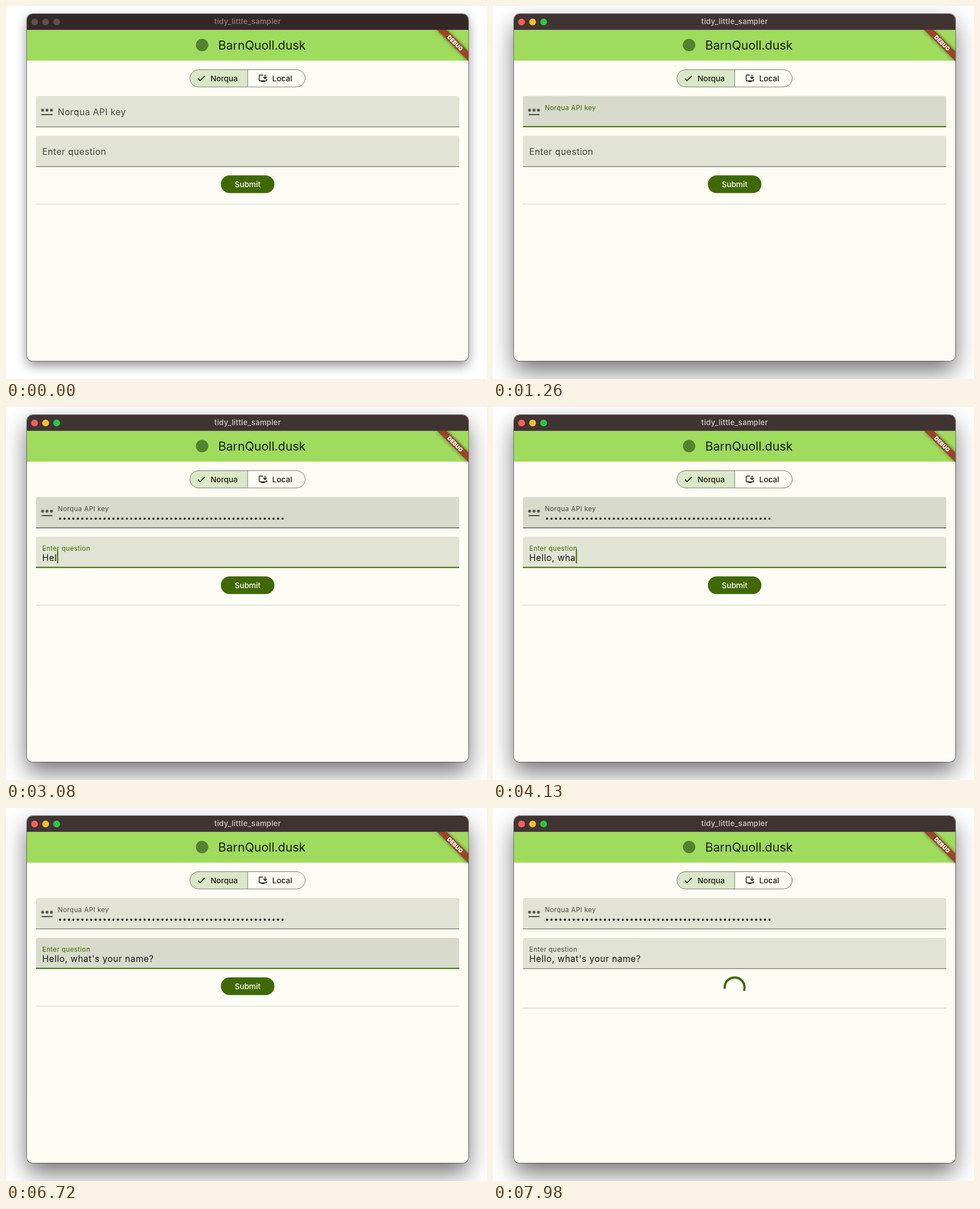
An HTML page for the animation above (8 s loop, 850x659 px).

```html
<!DOCTYPE html>
<html lang="en">
<head>
<meta charset="utf-8">
<title>Question form</title>
<style>
  html, body { margin: 0; width: 100%; height: 100%; overflow: hidden; background: #fff; }
  #shadow, svg { position: absolute; }
  #shadow {
    left: 37px; top: 14px; width: 780px; height: 613px; border-radius: 10px;
    box-shadow: 0 0 0 1px rgba(0,0,0,.4), 0 8px 20px rgba(0,0,0,.45);
  }
  .active #shadow { box-shadow: 0 0 0 1px rgba(0,0,0,.45), 0 18px 40px rgba(0,0,0,.55); }
  svg { left: 0; top: 0; display: block; }
  text { font-family: Inter, "Open Sans", sans-serif; font-optical-sizing: none; fill: #1a1c16; }
  .field { font-size: 15.6px; letter-spacing: .49px; }
  .button { font-size: 13.65px; font-weight: 550; }

  #bar { fill: #342827; }
  #windowTitle { font-size: 13px; font-weight: 600; letter-spacing: .25px; fill: #837876; }
  .light { fill: #5b4f4d; }
  .active #bar { fill: #403433; }
  .active #windowTitle { fill: #c3bab7; }
  .active .red { fill: #ff5f57; }
  .active .amber { fill: #febc2e; }
  .active .green { fill: #28c840; }

  .fill { fill: #e1e4d5; }
  .line { fill: #777b6e; }
  .label { fill: #44483d; }
  .hover .fill { fill: #d8dacc; }
  .hover .line { fill: #4a4d43; }
  .focus .line { fill: #3f6900; }
  .focus .label { fill: #3f6900; }
  .caret { fill: #3f6900; }
</style>
</head>
<body>
<div id="shadow"></div>
<svg width="850" height="659" viewBox="0 0 850 659">
  <defs>
    <clipPath id="frame"><rect x="37" y="14" width="780" height="613" rx="10"/></clipPath>
    <clipPath id="content"><rect x="37" y="42" width="780" height="585"/></clipPath>
    <filter id="blur" x="-20%" y="-100%" width="140%" height="300%"><feGaussianBlur stdDeviation="3"/></filter>
  </defs>

  <g clip-path="url(#frame)">
    <rect x="37" y="14" width="780" height="613" fill="#fdfdf5"/>
    <rect id="bar" x="37" y="14" width="780" height="28.5"/>
    <circle class="light red" cx="50.5" cy="28.2" r="6"/>
    <circle class="light amber" cx="70" cy="28.2" r="6"/>
    <circle class="light green" cx="89.5" cy="28.2" r="6"/>
    <text id="windowTitle" x="427" y="32.3" text-anchor="middle">tidy_little_sampler</text>

    <rect x="37" y="42.5" width="780" height="54" fill="#9fdb5c"/>
    <circle cx="346.5" cy="69" r="11" fill="#55822f"/>
    <text x="375" y="77" font-size="21.45">BarnQuoll.dusk</text>

    <g clip-path="url(#content)">
      <g transform="translate(817 42) rotate(45)">
        <rect x="-39" y="27.3" width="78" height="11.7" opacity=".5" filter="url(#blur)"/>
        <rect x="-39" y="27.3" width="78" height="11.7" fill="#9b4527"/>
        <text y="36.7" text-anchor="middle" font-size="9.9" font-weight="900" style="fill:#fff">DEBUG</text>
      </g>
    </g>
  </g>

  <path d="M427 112.5H340a15.25 15.25 0 0 0 0 30.5H427z" fill="#dbe7c8"/>
  <rect x="324.8" y="112.5" width="204" height="30.5" rx="15.25" fill="none" stroke="#75796c"/>
  <path d="M427 112.5v30.5" stroke="#75796c"/>
  <path transform="translate(336.4 119) scale(.731)" fill="#131f00"
        d="M9 16.17 4.83 12l-1.42 1.41L9 19 21 7l-1.41-1.41z"/>
  <text class="button" x="361.5" y="132.8">Norqua</text>
  <g transform="translate(445.3 119) scale(.731)" fill="#1a1c16">
    <path d="M20 17H4V5h8V3H4a2 2 0 0 0-2 2v12a2 2 0 0 0 2 2h4v2h8v-2h4a2 2 0 0 0 2-2v-3h-2z"/>
    <path d="M17 14l5-5-1.41-1.41L18 10.17V3h-2v7.17l-2.59-2.58L12 9z"/>
  </g>
  <text class="button" x="470.5" y="132.8">Local</text>

  <g id="key">
    <path class="fill" d="M53 214v-51a4 4 0 0 1 4-4H797a4 4 0 0 1 4 4v51z"/>
    <rect class="line" x="53" width="748"/>
    <g transform="translate(60.8 174.3) scale(.975)" fill="#44483d">
      <path d="M2 17h20v2H2z"/>
      <path id="star" d="M3.15 12.95 4 11.47l.85 1.48 1.3-.75-.85-1.48H7v-1.5H5.3l.85-1.47L4.85 7 4 8.47 3.15 7l-1.3.75.85 1.47H1v1.5h1.7l-.85 1.48z"/>
      <use href="#star" x="8"/><use href="#star" x="16"/>
    </g>
    <text class="field label">Norqua API key</text>
    <path id="dots" d="M95.6 197.2H489" stroke="#1a1c16" stroke-width="4" stroke-linecap="round" stroke-dasharray="0 7.86"/>
    <rect class="caret" y="181" width="2" height="25"/>
  </g>

  <g id="question">
    <path class="fill" d="M53 284.3v-51a4 4 0 0 1 4-4H797a4 4 0 0 1 4 4v51z"/>
    <rect class="line" x="53" width="748"/>
    <text class="field label">Enter question</text>
    <text id="typed" class="field" x="64" y="272.2" xml:space="preserve"></text>
    <rect class="caret" y="251.3" width="2" height="25"/>
  </g>

  <g id="submit">
    <rect x="379.7" y="299.3" width="94.6" height="31.2" rx="15.6" fill="#3f6900"/>
    <rect id="overlay" x="379.7" y="299.3" width="94.6" height="31.2" rx="15.6" fill="#fff"/>
    <text class="button" x="427" y="319.8" text-anchor="middle" style="fill:#fff">Submit</text>
  </g>
  <circle id="spinner" cx="427" cy="317" r="17.55" pathLength="360" fill="none"
          stroke="#3f6900" stroke-width="3.9" stroke-linecap="square"/>
  <rect id="divider" x="53" width="748" height="1" fill="#c9ccbe"/>
</svg>

<script>
const LOOP = 8000, STEP = 70;
const ACTIVATE = 630, KEY_FOCUS = 700, PASTE = 1540, QUESTION_FOCUS = 1960, PRESS = 6930, LOADING = 7140;
const MESSAGE = "Hello, what's your name?";
const KEYSTROKES = [
  2590, 2800, 3080, 3220, 3640, 3710, 3850, 3990, 4060, 4130, 4270, 4410,
  4410, 4550, 4760, 4900, 5040, 5040, 5180, 5320, 5600, 5670, 5810, 6090
];

const $ = id => document.getElementById(id);
const within = (t, from, to) => t >= from && t < to;
const clamp = x => Math.min(1, Math.max(0, x));
const show = (el, visible) => el.style.display = visible ? "" : "none";

// cubic-bezier(.4, 0, .2, 1)
function ease(x) {
  x = clamp(x);
  let low = 0, high = 1;
  for (let i = 0; i < 24; i++) {
    const s = (low + high) / 2;
    const at = 1.2 * s * (1 - s) ** 2 + .6 * s * s * (1 - s) + s ** 3;
    if (at < x) low = s; else high = s;
  }
  return low * low * (3 - 2 * low);
}

function makeField(id, labelX, bottom) {
  const group = $(id), part = name => group.querySelector("." + name);
  const line = part("line"), label = part("label"), caret = part("caret");
  return ({ focus, hover, float, caretX, caretOn }) => {
    group.classList.toggle("focus", focus);
    group.classList.toggle("hover", hover);
    const weight = focus ? 2 : 1.3;
    line.setAttribute("y", bottom - weight);
    line.setAttribute("height", weight);
    const y = bottom - 30 + 8.3 * (1 - float) ** 1.5;
    label.setAttribute("transform", `translate(${labelX} ${y}) scale(${1 - float / 4})`);
    caret.setAttribute("x", caretX);
    show(caret, caretOn);
  };
}
const drawKey = makeField("key", 91.5, 214.2);
const drawQuestion = makeField("question", 64, 284.4);

function drawSpinner(ms) {
  const cycle = ms % 1333 / 1333;
  const head = 270 * ease(cycle * 2), tail = 270 * ease(cycle * 2 - 1);
  const start = tail + ms / 2222 * 360 + cycle * 90 - 90;
  const sweep = Math.max(head - tail, .1);
  $("spinner").setAttribute("stroke-dasharray", `${sweep} ${360 - sweep}`);
  $("spinner").setAttribute("transform", `rotate(${start} 427 317)`);
}

function render(time) {
  const t = Math.floor(time / STEP) * STEP;
  document.body.classList.toggle("active", t >= ACTIVATE);

  drawKey({
    focus: within(t, KEY_FOCUS, QUESTION_FOCUS),
    hover: within(t, KEY_FOCUS, 6580),
    float: ease((t - 655) / 167),
    caretX: t < PASTE ? 92 : 492,
    caretOn: within(t, KEY_FOCUS, 1260) || within(t, PASTE, QUESTION_FOCUS)
  });
  show($("dots"), t >= PASTE);

  const count = KEYSTROKES.filter(k => k <= t).length;
  const typed = $("typed");
  typed.textContent = MESSAGE.slice(0, count);
  drawQuestion({
    focus: within(t, QUESTION_FOCUS, PRESS),
    hover: within(t, 6650, 6790),
    float: ease((t - 1892) / 167),
    caretX: 64.3 + (count ? typed.getComputedTextLength() : 0),
    caretOn: within(t, QUESTION_FOCUS, 2450) || within(t, KEYSTROKES[0], 6580)
  });

  const loading = t >= LOADING;
  show($("submit"), !loading);
  show($("spinner"), loading);
  $("overlay").setAttribute("opacity", t >= PRESS ? .16 : t >= 6790 ? .08 : 0);
  $("divider").setAttribute("y", loading ? 353.2 : 349.5);
  if (loading) drawSpinner(44 + (t - LOADING) / 1.05);
}

const began = performance.now();
(function tick() {
  render((performance.now() - began) % LOOP);
  requestAnimationFrame(tick);
})();
</script>
</body>
</html>
```
